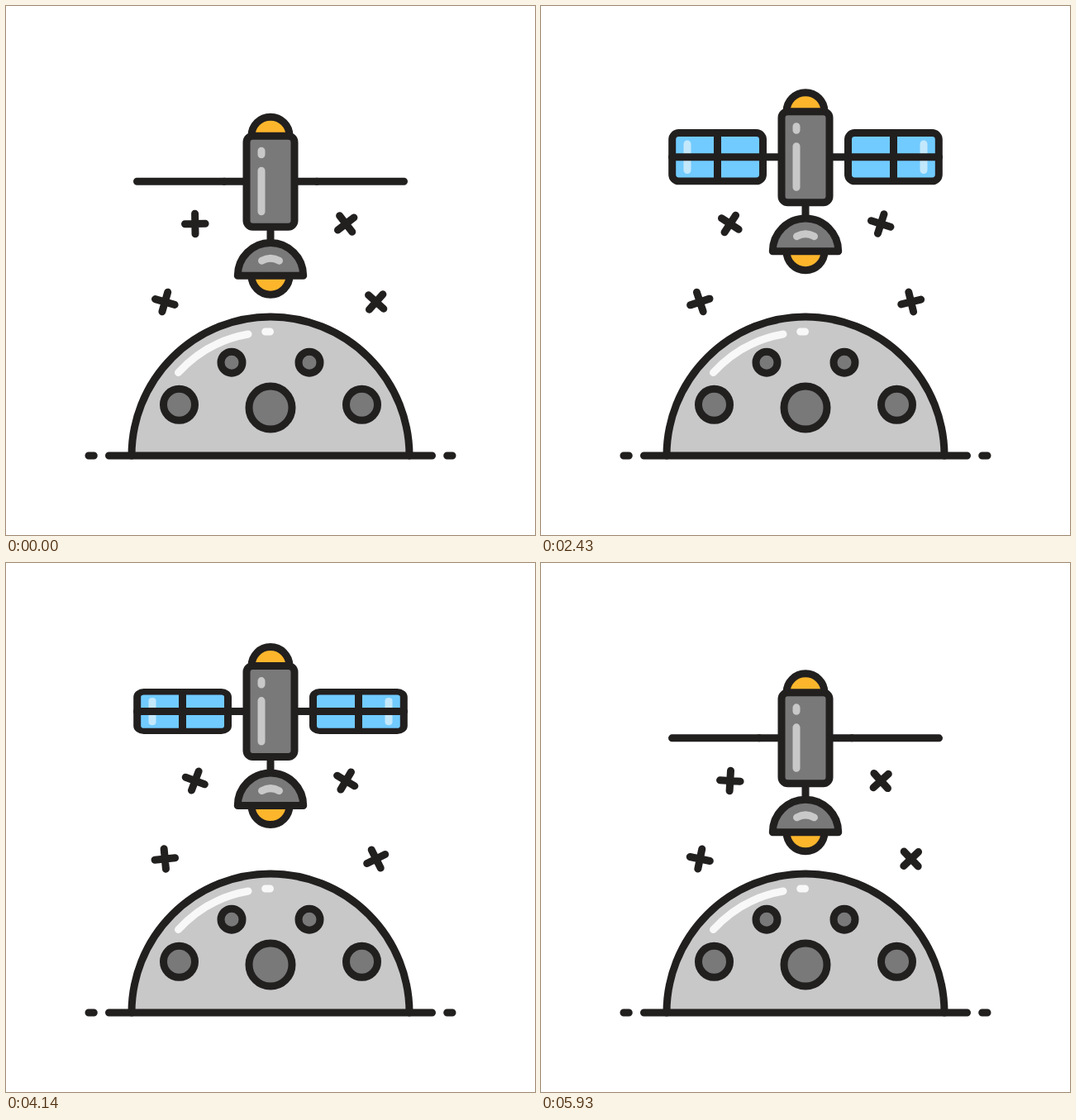
An HTML page for the animation above (6000 ms loop, 640 px wide and 640 px high).

```html
<!DOCTYPE html>
<html lang="en">
<head>
<meta charset="utf-8">
<title>Satellite over the moon</title>
<style>
  html, body { margin: 0; width: 100%; height: 100%; overflow: hidden; background: #fff; }
  svg { display: block; width: 100vw; height: 100vh; }
  .ink { stroke: #221f1f; stroke-width: 9; stroke-linecap: round; stroke-linejoin: round; fill: none; }
  .shine { stroke: #c8c8c8; stroke-width: 9; stroke-linecap: round; fill: none; }
  .gray { fill: #797979; }
  .moon { fill: #c8c8c8; }
  .gold { fill: #fdb62c; }
  .blue { fill: #71cbff; }
  .white { stroke: #f8f8f8; }
  .ice { stroke: #c3e8fc; }
</style>
</head>
<body>
<svg viewBox="0 0 640 640">
  <defs>
    <g id="wing">
      <rect class="ink blue" x="158.7" y="-29.5" width="109.8" height="59" rx="8"/>
      <path class="shine ice" d="M177 -16V16"/>
      <path class="ink" d="M213.5 -29V29"/>
    </g>
    <g id="craters" class="ink">
      <circle class="gray" cx="209.5" cy="482.3" r="19"/>
      <circle class="gray" cx="273" cy="431.2" r="13"/>
    </g>
    <path id="star" class="ink" d="M-12.3 0H12.3M0 -12.3V12.3"/>
  </defs>

  <path class="ink moon" d="M152 544A168 168 0 0 1 488 544"/>
  <path class="ink" d="M124.5 544H515.5M100 544H106.3M533.7 544H540"/>
  <path class="shine white" d="M208.5 443.5A150 150 0 0 1 293 397M313.7 394H319.5"/>
  <use href="#craters"/>
  <use href="#craters" transform="translate(640) scale(-1 1)"/>
  <circle class="ink gray" cx="320" cy="486" r="26"/>

  <g id="stars"></g>

  <g id="craft">
    <path class="ink" d="M264 0H376"/>
    <g id="wings">
      <use href="#wing"/>
      <use href="#wing" transform="translate(640) scale(-1 1)"/>
    </g>
    <path class="ink" d="M158.5 0H264M376 0H481.5"/>
    <path class="ink gold" d="M297 -55A23 23 0 0 1 343 -55"/>
    <path class="ink" d="M320 55V74"/>
    <rect class="ink gray" x="291" y="-55" width="58" height="110" rx="7.5"/>
    <path class="shine" d="M309 -37V-32.5M309 -13V36.5"/>
    <path class="ink gold" d="M297 114A23 23 0 0 0 343 114"/>
    <path class="ink gray" d="M280.3 114A39.7 39.7 0 0 1 359.7 114Z"/>
    <path class="shine" d="M309.5 96Q320 90 330.5 96"/>
  </g>
</svg>
<script>
const LOOP = 6000, FPS = 14, STEPS = LOOP / 1000 * FPS;

// Key poses as [time, value], eased in and out between them
const height = [[0, 212.2], [1740, 173.4], [3190, 193.5], [4700, 173.4], [LOOP, 212.2]];
const spread = [[0, 0], [640, .86], [1700, .78], [2600, 1.01], [4900, .74], [LOOP, 0]];

function ease(keys, t) {
  const i = keys.findIndex(([time]) => time > t);
  const [t0, v0] = keys[i - 1], [t1, v1] = keys[i];
  const u = (t - t0) / (t1 - t0);
  return v0 + (v1 - v0) * u * u * (3 - 2 * u);
}

function makeStar(x, y, angle, turn) {
  const el = document.createElementNS('http://www.w3.org/2000/svg', 'use');
  el.setAttribute('href', '#star');
  document.getElementById('stars').append(el);
  return t => el.setAttribute('transform',
    `translate(${x} ${y}) rotate(${angle + turn * 360 * t / LOOP})`);
}

const craft = document.getElementById('craft');
const wings = document.getElementById('wings');
const stars = [
  makeStar(228.8, 263.5, -1, -1), makeStar(411.2, 263.5, 52, 1),
  makeStar(192.3, 358, 16, 1), makeStar(447.7, 358, 42, -1)
];

function draw(t) {
  craft.setAttribute('transform', `translate(0 ${ease(height, t)})`);
  wings.setAttribute('transform', `scale(1 ${Math.max(.001, ease(spread, t))})`);
  stars.forEach(spin => spin(t));
}

const start = performance.now();
function tick() {
  const t = (performance.now() - start) % LOOP;
  // The small lead absorbs rounding of the step times
  const step = Math.floor((t + 5) * STEPS / LOOP) % STEPS;
  draw(step * LOOP / STEPS);
  requestAnimationFrame(tick);
}
tick();
</script>
</body>
</html>
```
